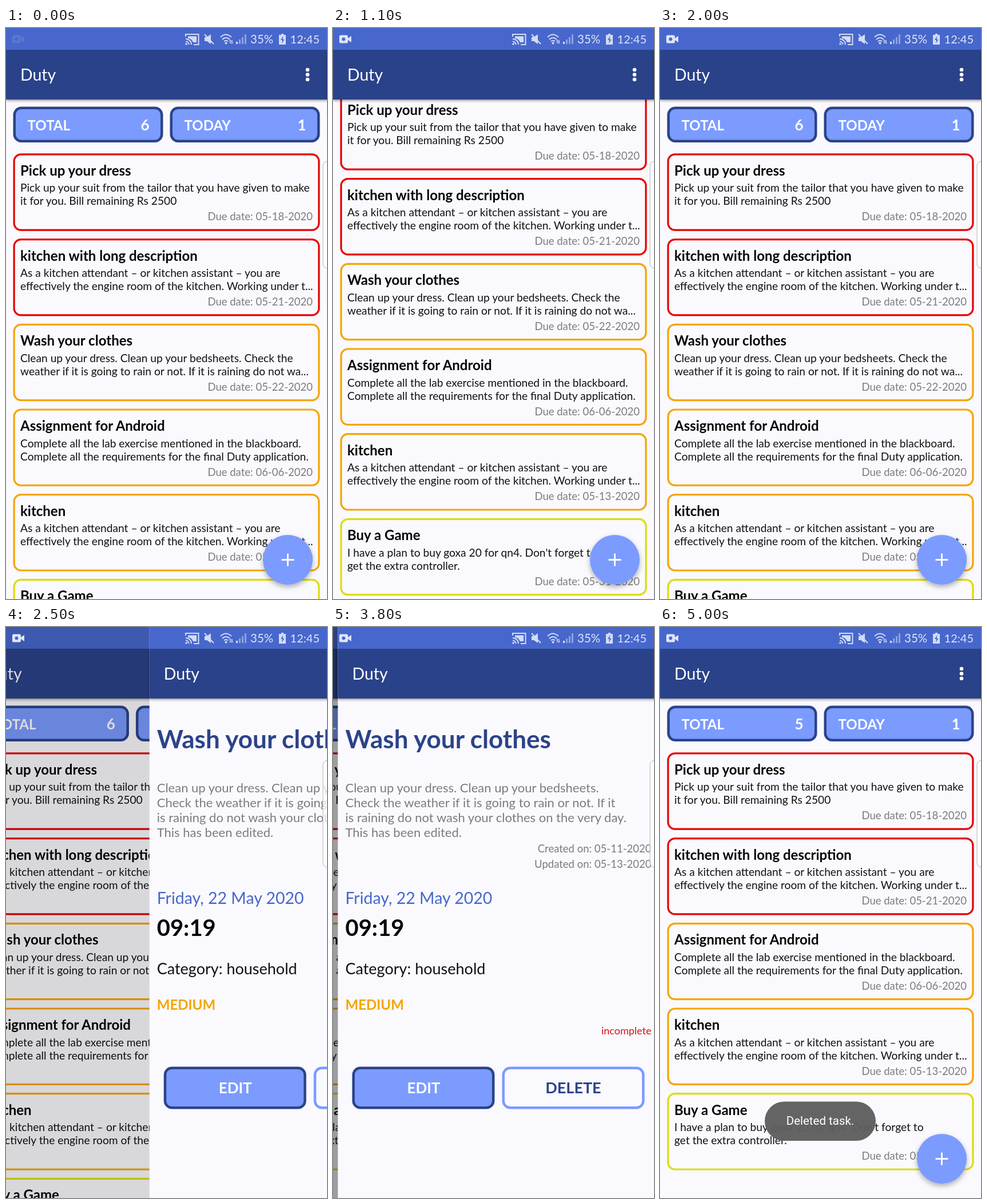
Recreate the animation shown at these times as an HTML page. Size 561 px wide and 998 px high, loop 5.6 s.

```html
<!DOCTYPE html>
<html lang="en">
<head>
<meta charset="utf-8">
<title>Task list</title>
<style>
  html, body { margin: 0; width: 100%; height: 100%; overflow: hidden; background: #faf9fd; }
  svg { display: block; font-family: Lato, sans-serif; }
</style>
</head>
<body>
<svg id="stage" width="561" height="998" viewBox="0 0 561 998"></svg>
<script>
const W = 561, H = 998, LOOP = 5600, STEP = 100;
const NAVY = '#2c4389', BLUE = '#4767cc', SKY = '#7b9bff', PAPER = '#faf9fd', GREY = '#7c7b7e';
const RED = '#e60000', ORANGE = '#f5a500', YELLOW = '#d9de0a';

const kitchen = ['As a kitchen attendant – or kitchen assistant – you are',
  'effectively the engine room of the kitchen. Working under t...'];
const tasks = [
  [RED, 'Pick up your dress', '05-18-2020',
    'Pick up your suit from the tailor that you have given to make', 'it for you. Bill remaining Rs 2500'],
  [RED, 'kitchen with long description', '05-21-2020', ...kitchen],
  [ORANGE, 'Wash your clothes', '05-22-2020',
    'Clean up your dress. Clean up your bedsheets. Check the',
    'weather if it is going to rain or not. If it is raining do not wa...'],
  [ORANGE, 'Assignment for Android', '06-06-2020',
    'Complete all the lab exercise mentioned in the blackboard.',
    'Complete all the requirements for the final Duty application.'],
  [ORANGE, 'kitchen', '05-13-2020', ...kitchen],
  [YELLOW, 'Buy a Game', '05-31-2020',
    "I have a plan to buy goxa 20 for qn4. Don't forget to", 'get the extra controller.']
];

const text = (x, y, size, fill, str, attrs = '') =>
  `<text x="${x}" y="${y}" font-size="${size}" fill="${fill}" ${attrs}>${str}</text>`;
const bold = 'font-weight="700"', end = 'text-anchor="end"', mid = 'text-anchor="middle"';
const rect = (x, y, w, h, fill, attrs = '') =>
  `<rect x="${x}" y="${y}" width="${w}" height="${h}" fill="${fill}" ${attrs}/>`;
// Rounded box given by its outer edges, with the border drawn inside.
const box = (x, y, w, h, fill, stroke, line) =>
  rect(x + line / 2, y + line / 2, w - line, h - line, fill, `rx="12" stroke="${stroke}" stroke-width="${line}"`);

const appBar = () =>
  rect(0, 38, W, 87, NAVY, 'filter="url(#low)"') + rect(0, 0, W, 38, BLUE) +
  text(25, 92, 28.5, '#fff', 'Duty');

const stat = (x, label, count) =>
  box(x, 137.5, 262, 62.5, SKY, NAVY, 4.5) +
  text(x + 25, 179, 24, '#fff', label, bold) + text(x + 238, 179, 26, '#fff', count, `${bold} ${end}`);

const card = ([color, title, due, ...lines], i) =>
  `<g transform="translate(0 ${219.3 + 148.7 * i})">` +
  box(12.5, 0, 536, 135.5, PAPER, color, 3.2) +
  text(25, 38.7, 24, '#050505', title, bold) +
  lines.map((line, n) => text(25, 67.2 + 23 * n, 19.2, '#111', line)).join('') +
  text(536, 117.2, 18.5, GREY, `Due date: ${due}`, end) + '</g>';

const listContent = items =>
  stat(12.5, 'TOTAL', items.length) + stat(286.5, 'TODAY', 1) + items.map(card).join('');

const detail = () =>
  rect(0, 0, W, H, PAPER) + appBar() +
  text(13, 212, 44, NAVY, 'Wash your clothes', bold) +
  ['Clean up your dress. Clean up your bedsheets.',
   'Check the weather if it is going to rain or not. If it',
   'is raining do not wash your clothes on the very day.',
   'This has been edited.'].map((line, n) => text(13, 289 + 26 * n, 22, GREY, line)).join('') +
  text(548, 394, 18.5, GREY, 'Created on: 05-11-2020', end) +
  text(548, 421, 18.5, GREY, 'Updated on: 05-13-2020', end) +
  text(13, 484, 28.5, BLUE, 'Friday, 22 May 2020') +
  text(13, 540, 40, '#050505', '09:19', bold) +
  text(13, 607, 27, '#111', 'Category: household') +
  text(13, 669, 24, ORANGE, 'MEDIUM', bold) +
  text(548, 712, 18, '#dc1010', 'incomplete', end) +
  box(25, 768.5, 249, 74, SKY, NAVY, 4.5) + text(150, 815, 26, '#fff', 'EDIT', `${bold} ${mid}`) +
  box(287, 768.5, 249, 74, PAPER, SKY, 4.5) + text(411.5, 815, 27, NAVY, 'DELETE', `${bold} ${mid}`);

const statusIcons = `
  <g id="camera" fill="#dfe5f8"><rect x="11" y="12.5" width="15" height="14" rx="2.5"/>
    <path d="M26 18l6-4v11l-6-4z"/><circle cx="18.5" cy="19.5" r="3" fill="${BLUE}"/></g>
  <g fill="none" stroke="#d3dbf4" stroke-width="2">
    <path d="M314 15V11H336.5V29H328M314 19a10 10 0 0 1 10 10M314 23.5a5.5 5.5 0 0 1 5.5 5.5"/>
    <path d="M347 11l16 17"/>
    <path d="M375 16q9-9 19 0M378 20q6.5-6 13 0M381 23.5q3.5-3 7 0"/></g>
  <g fill="#d3dbf4"><path d="M318 14.5H333V25H327q-3-7-9-7z"/><circle cx="315" cy="28" r="1.8"/>
    <path d="M347 16h4l7-5v17l-7-5h-4z"/><circle cx="384.5" cy="26.5" r="2"/>
    <path d="M391 27v-4h-1.5l2.5-3 2.5 3H393v4zM396 21v4h1.5l-2.5 3-2.5-3H394v-4z" opacity=".7"/>
    <path d="M402 28v-4h3v4z"/><path d="M407 28v-8h3v8zM412 28v-12h3v12zM417 28V11h3v17z" opacity=".5"/>
    <path d="M481 10h4v2h4v17h-12V12h4z"/></g>
  <path d="M484.5 14l-4.5 7h3l-1 6 4.5-7h-3z" fill="${BLUE}"/>` +
  text(427, 27, 20.5, '#dfe5f8', '35%') + text(548, 27, 20, '#dfe5f8', '12:45', end);

const $ = id => document.getElementById(id);

$('stage').innerHTML = `
  <filter id="low" x="-5%" width="110%" y="-10%" height="130%">
    <feDropShadow dx="0" dy="2" stdDeviation="2" flood-opacity=".4"/></filter>
  <filter id="high" x="-30%" width="160%" y="-30%" height="160%">
    <feDropShadow dx="0" dy="4" stdDeviation="4" flood-opacity=".3"/></filter>
  <g id="home">${rect(0, 0, W, H, PAPER)}<g id="list"></g>${appBar()}
    ${[73, 81.5, 90].map(y => `<circle cx="527" cy="${y}" r="3.3" fill="#fff"/>`).join('')}
    <circle cx="492.5" cy="929.5" r="43.5" fill="${SKY}" filter="url(#high)"/>
    <path d="M481.5 929.5h22M492.5 918.5v22" stroke="#fff" stroke-width="2.8"/>
    ${rect(0, 0, W, H, '#000', 'id="dim"')}</g>
  <g id="detail">${detail()}</g>
  ${statusIcons}
  ${rect(554, 233.5, 20, 186, '#fff', 'rx="7" fill-opacity=".75" stroke="#b5b5b8"')}
  <g id="toast">${rect(183, 829.5, 194, 68.5, '#5e5e5e', 'rx="34" fill-opacity=".96"')}
    ${text(280, 870, 20.5, '#fff', 'Deleted task.', `${mid} font-family="Roboto, sans-serif"`)}</g>`;

const progress = (t, start, length) => Math.min(1, Math.max(0, (t - start) / length));
const easeOut = (u, power) => 1 - (1 - u) ** power;

// Page slide: cubic-bezier(.33, 0, .2, 1), solved for time by bisection.
function slide(u) {
  let low = 0, high = 1, s = 0.5;
  for (let i = 0; i < 20; i++) {
    const x = 0.99 * s * (1 - s) ** 2 + 0.6 * s * s * (1 - s) + s ** 3;
    if (x < u) low = s; else high = s;
    s = (low + high) / 2;
  }
  return s * s * (3 - 2 * s);
}

let shownCount = 0;

function draw(t) {
  const items = t < 3300 ? tasks : tasks.filter((_, i) => i !== 2);
  if (items.length !== shownCount) {
    $('list').innerHTML = listContent(items);
    shownCount = items.length;
  }
  const scroll = 112 * (easeOut(progress(t, 700, 500), 1.8) - easeOut(progress(t, 1300, 400), 1.3));
  $('list').setAttribute('transform', `translate(0 ${-Math.round(scroll)})`);

  // Share of the screen covered by the detail page.
  const opening = progress(t, 2340, 460), closing = progress(t, 3770, 460);
  const cover = slide(opening) - slide(closing);
  $('detail').setAttribute('transform', `translate(${W * (1 - cover)} 0)`);
  $('home').setAttribute('transform', `translate(${-0.192 * W * cover} 0)`);
  $('dim').setAttribute('opacity', 0.4 * (opening - closing));

  $('camera').setAttribute('opacity', 0.12 + 0.88 * progress(t, 0, 200));
  $('toast').setAttribute('opacity', progress(t, 3800, 260));
}

const began = performance.now();
function tick() {
  const t = (performance.now() - began) % LOOP;
  draw(Math.floor(t / STEP) * STEP);
  requestAnimationFrame(tick);
}
tick();
</script>
</body>
</html>
```
